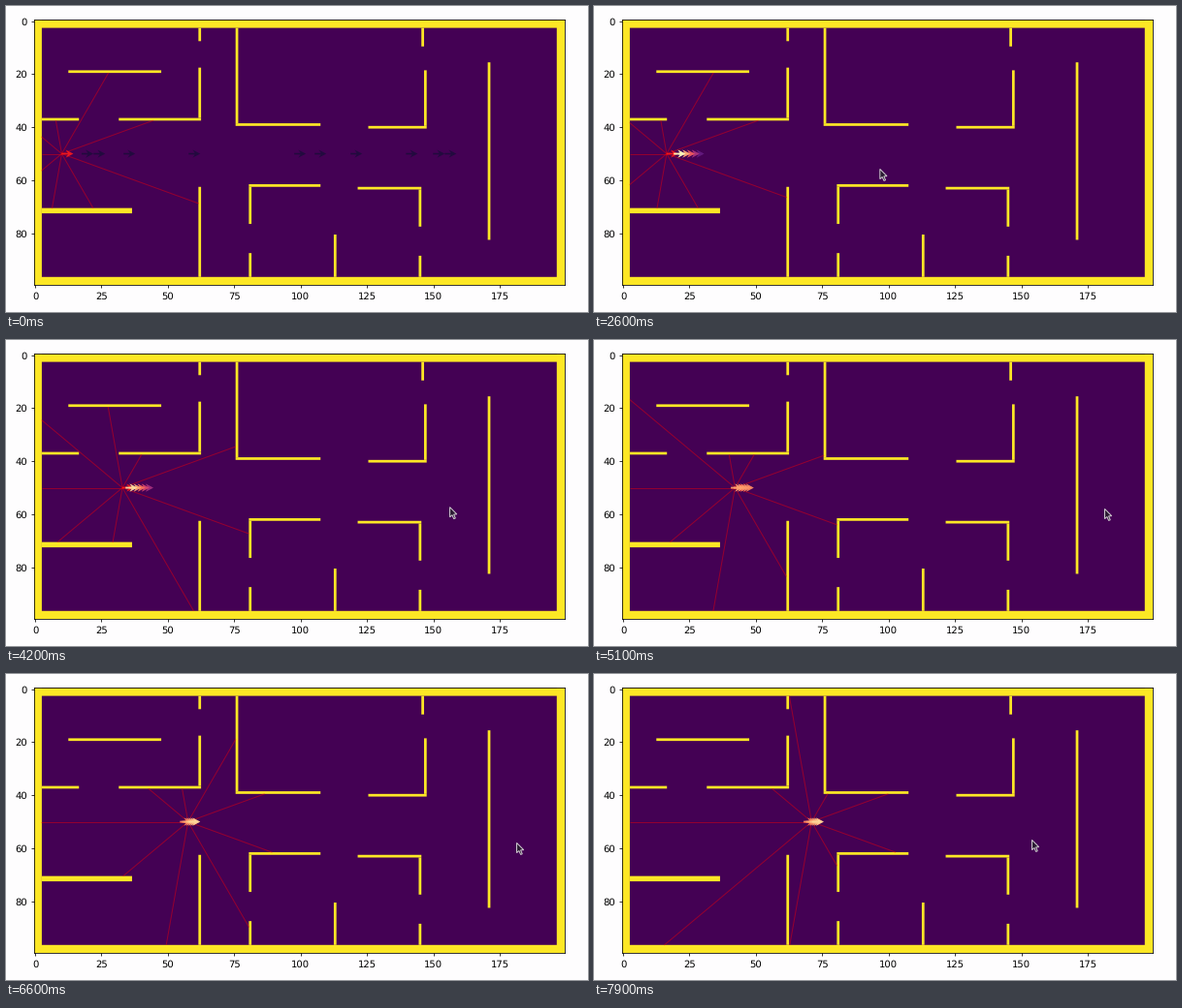
Write a matplotlib script that moves like this. It is 600 px wide and 316 px high and loops after 8 s.

```python
import numpy as np
import matplotlib.pyplot as plt
from matplotlib.animation import FuncAnimation
from matplotlib.collections import LineCollection
from matplotlib.patches import Polygon, Rectangle

W, H, DPI = 600, 316, 100
FRAMES, STEP_MS = 80, 100
COLS, ROWS = 200, 100
START, SPEED = 19.8, 1.03     # first driving frame, cells per frame
ROBOT_Y = 50
PT = 0.7                      # default matplotlib sizes scaled to this stage
L, R, T, B = 28.7, 576, 14.4, 288

plt.rcParams.update({
    "font.family": "DejaVu Sans", "font.size": 10 * PT,
    "text.hinting": "none", "text.hinting_factor": 1,
    "axes.linewidth": 0.8 * PT,
})

fig = plt.figure(figsize=(W / DPI, H / DPI), dpi=DPI, facecolor="#fefdfe")
ax = fig.add_axes([L / W, 1 - B / H, (R - L) / W, (B - T) / H])
viridis, magma = plt.get_cmap("viridis"), plt.get_cmap("magma")
ax.set_facecolor(viridis(0.0))
ax.set_xlim(-0.5, COLS - 0.5)
ax.set_ylim(ROWS - 0.5, -0.5)
ax.set_xticks(range(0, COLS, 25))
ax.set_yticks(range(0, ROWS, 20))
ax.tick_params(length=3.5 * PT, width=0.8 * PT, pad=3.5 * PT)

grid = np.zeros((ROWS, COLS), bool)


def block(c0, r0, c1, r1):
    grid[r0:r1, c0:c1] = True
    ax.add_patch(Rectangle((c0 - 0.5, r0 - 0.5), c1 - c0, r1 - r0,
                           facecolor=viridis(1.0), linewidth=0, snap=False))


def hwall(row, a, b, door=None, thick=1):
    for s, e in [(a, door[0]), (door[1], b)] if door else [(a, b)]:
        block(s, row, e, row + thick)


def vwall(col, a, b, door=None, thick=1):
    for s, e in [(a, door[0]), (door[1], b)] if door else [(a, b)]:
        block(col, s, col + thick, e)


def build_map():
    for edge in (0, ROWS - 3):
        hwall(edge, 0, COLS, thick=3)
    for edge in (0, COLS - 3):
        vwall(edge, 0, ROWS, thick=3)
    # left rooms
    hwall(19, 13, 48)
    hwall(37, 3, 63, door=(17, 32))
    hwall(71, 3, 37, thick=2)
    vwall(62, 3, 37, door=(8, 18))
    vwall(62, 63, 97)
    # upper room
    vwall(76, 3, 39)
    hwall(39, 76, 108)
    hwall(40, 126, 148)
    vwall(146, 3, 10)
    vwall(147, 19, 40)
    # lower rooms
    hwall(62, 81, 108)
    hwall(63, 122, 146)
    vwall(81, 63, 97, door=(77, 88))
    vwall(145, 64, 97, door=(78, 89))
    vwall(113, 81, 97)
    # far right
    vwall(171, 16, 83)


build_map()

ANGLES = np.radians(np.arange(20, 360, 40))
SPREAD = np.array([17.5, 22, 33.3, 57.8, 97.6, 105.3, 118.8, 139.7, 149.9, 154.3])
N = len(SPREAD)


def smooth(t):
    t = np.clip(t, 0, 1)
    return t * t * (3 - 2 * t)


def robot_x(f):
    return 10 + SPEED * max(0, f - START)


def cast(x, y, angle):
    dx, dy = np.cos(angle), -np.sin(angle)
    dist = np.arange(0, 220, 0.25)
    cols = np.clip(np.rint(x + dist * dx), 0, COLS - 1).astype(int)
    rows = np.clip(np.rint(y + dist * dy), 0, ROWS - 1).astype(int)
    d = dist[np.argmax(grid[rows, cols])]
    return [(x, y), (x + d * dx, y + d * dy)]


def particles(f):
    if f < START:
        return SPREAD, np.tile(magma(0.1, alpha=0.7), (N, 1))
    # the cloud closes in on the robot while its weights even out
    k = smooth((f - 33) / 27)
    s = np.repeat(np.linspace(-1, 1, N // 2), 2)
    xs = robot_x(f) + 6.2 - 7.6 * k + (3.5 - 1.9 * k) * s
    near, far = 1 - 0.26 * k, 0.3 + 0.62 * k
    weight = near + (far - near) * (s + 1) / 2
    order = np.argsort(weight)
    return xs[order], magma(weight[order], alpha=0.75)


# pointer moves: first frame, last frame, start, end
ENTRY, REST, ASIDE, BACK = (596, 205), (294.8, 168.4), (526.5, 174.4), (451.5, 171.4)
MOVES = [(7, 16, ENTRY, REST), (37, 48, REST, ASIDE), (74, 79, ASIDE, BACK)]
TAIL = 0.9 * np.array([(0, 0), (0, 11.4), (2.6, 9), (4.6, 13.4),
                       (6.4, 12.6), (4.5, 8.3), (8, 8.1)])


def pointer_tip(f):
    tip = np.array(ENTRY, float)
    for a, b, p, q in MOVES:
        t = np.clip((f - a) / (b - a), 0, 1)
        tip += (1 - (1 - t) ** 2) * np.subtract(q, p)
    return tip


def arrows(n, color, z):
    size = 12 / (R - L)
    return ax.quiver(np.zeros(n), np.full(n, ROBOT_Y), np.full(n, size), np.zeros(n),
                     color=color, scale=1, scale_units="width", units="width",
                     width=0.003, headwidth=5, headlength=4.8, headaxislength=3.4,
                     zorder=z)


rays = LineCollection([], colors="red", linewidths=0.75, alpha=0.42, zorder=3)
ax.add_collection(rays, autolim=False)
robot = arrows(1, (1, 0.1, 0.1, 0.9), 4)
cloud = arrows(N, "black", 5)
ax.set_xlim(-0.5, COLS - 0.5)
ax.set_ylim(ROWS - 0.5, -0.5)

overlay = fig.add_axes([0, 0, 1, 1])
overlay.set_xlim(0, W)
overlay.set_ylim(H, 0)
overlay.axis("off")
pointer = Polygon(TAIL, closed=True, facecolor="#2b1b33",
                  edgecolor="#d2ced2", linewidth=0.7)
overlay.add_patch(pointer)


def update(f):
    x = robot_x(f)
    rays.set_segments([cast(x, ROBOT_Y, a) for a in ANGLES])
    robot.set_offsets([(x, ROBOT_Y)])
    xs, colors = particles(f)
    cloud.set_offsets(np.column_stack([xs, np.full(N, ROBOT_Y)]))
    cloud.set_facecolor(colors)
    pointer.set_visible(f >= MOVES[0][0])
    pointer.set_xy(TAIL + pointer_tip(f))
    return rays, robot, cloud, pointer


anim = FuncAnimation(fig, update, frames=FRAMES, interval=STEP_MS,
                     repeat=True, repeat_delay=0, blit=False)
plt.show()
```
